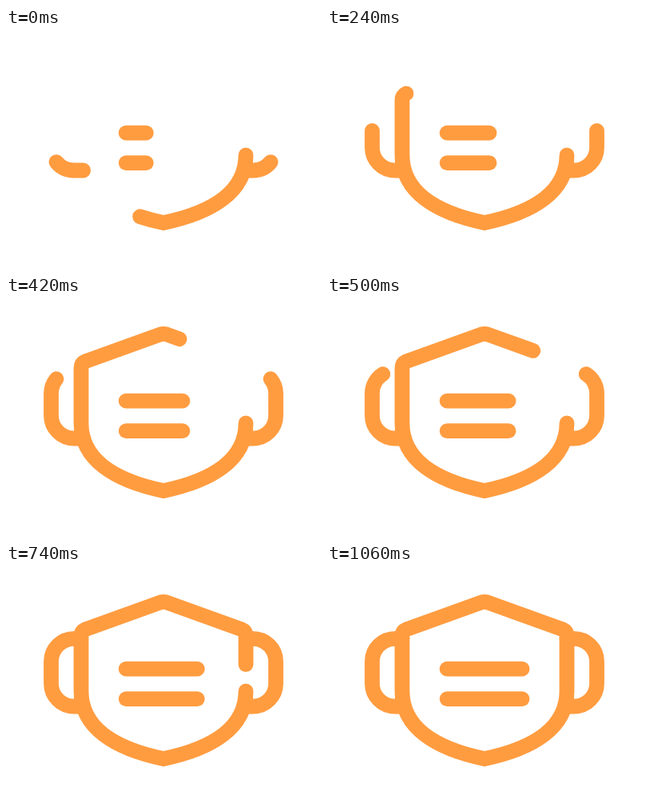
An HTML page for the animation above (1580 ms loop, 394x300 px).

```html
<!DOCTYPE html>
<html lang="en">
<head>
<meta charset="utf-8">
<title>Face mask</title>
<style>
  html, body {
    margin: 0;
    width: 100%;
    height: 100%;
    overflow: hidden;
    background: #fff;
  }
  svg {
    display: block;
    width: 100%;
    height: 100%;
  }
  .stroke {
    fill: none;
    stroke: #ff9c40;
    stroke-width: 18.8;
    stroke-linecap: round;
    stroke-linejoin: round;
    stroke-dasharray: 1 2;
    animation: draw 1580ms infinite;
  }
  /* Each line is already partly drawn when the loop begins, then holds once complete. */
  @keyframes draw {
    0% {
      stroke-dashoffset: .734;
      animation-timing-function: cubic-bezier(.28, .48, .48, 1);
    }
    67.1%, 100% { stroke-dashoffset: 0; }
  }
</style>
</head>
<body>
<svg viewBox="0 0 394 300">
  <!-- ear loops -->
  <path class="stroke" pathLength="1" d="M96.6 178H85A28.5 28.5 0 0 1 56.5 149.5V121.8A28.5 28.5 0 0 1 85 93.3H94"/>
  <path class="stroke" pathLength="1" d="M297.4 178H309A28.5 28.5 0 0 0 337.5 149.5V121.8A28.5 28.5 0 0 0 309 93.3H300"/>
  <!-- mask outline -->
  <path class="stroke" pathLength="1" d="M300 159C300 205 257 231 197 243.5C137 231 94 205 94 159V90Q94 84 100 81.5L193 48Q197 46.8 201 48L294 81.5Q300 84 300 90Z"/>
  <!-- pleats -->
  <path class="stroke" pathLength="1" d="M150.2 131.2H244"/>
  <path class="stroke" pathLength="1" d="M150.2 168.7H244"/>
</svg>
</body>
</html>
```
